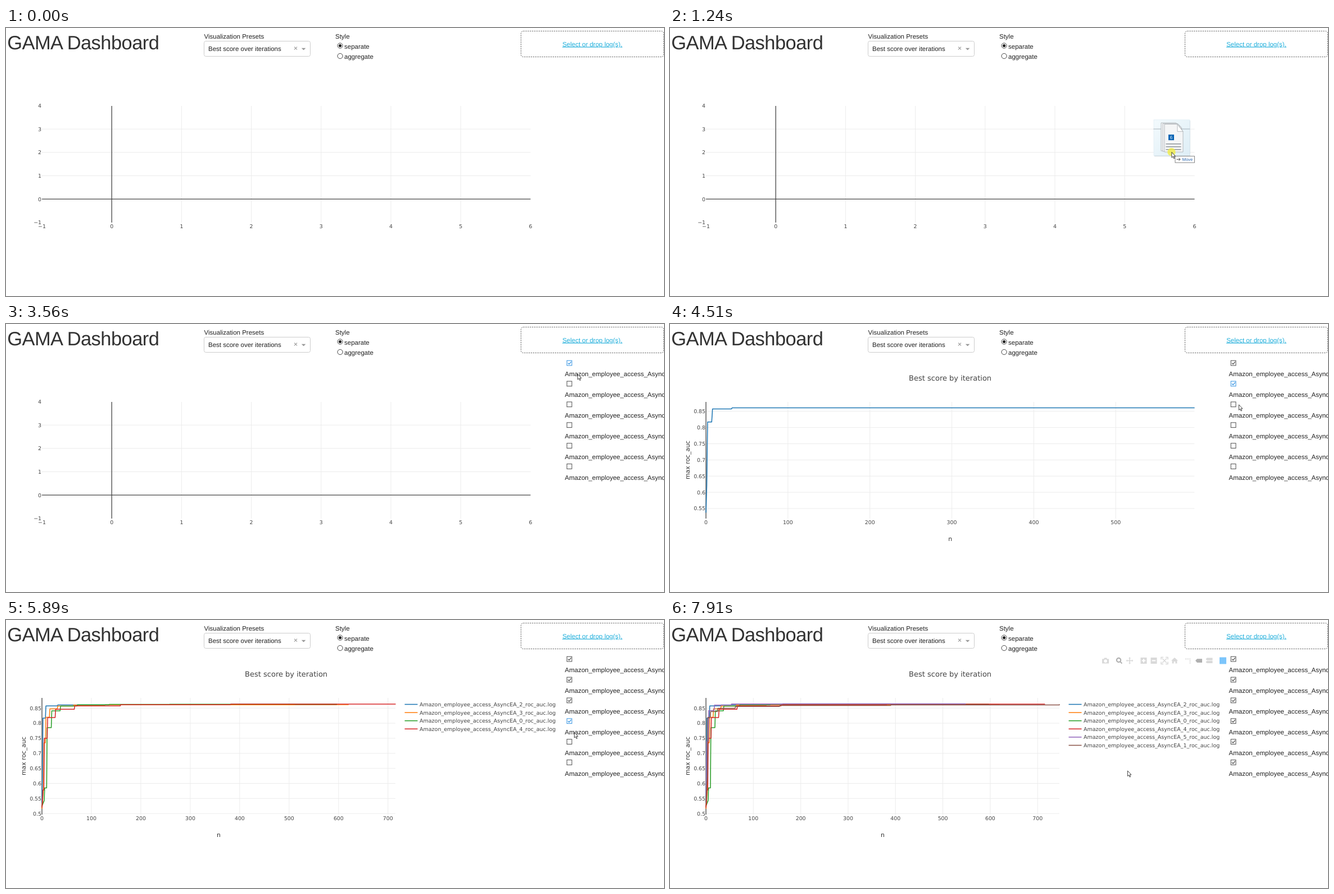
Recreate the animation shown at these times as an HTML page. Size 1171 by 478 pixels, loop 8000 ms.

```html
<!DOCTYPE html>
<html lang="en">
<head>
<meta charset="utf-8">
<title>GAMA Dashboard</title>
<style>
  html, body { margin: 0; width: 100%; height: 100%; overflow: hidden; background: #fff; }
  svg { display: block; width: 100%; height: 100%; }
  text { font: 11.5px "Liberation Sans", Arial, sans-serif; fill: #222; white-space: pre; text-rendering: geometricPrecision; }
  .h1 { font-size: 34.43px; letter-spacing: -.53px; fill: #323232; }
  .plot text { font: 9.4px "DejaVu Sans", Verdana, sans-serif; fill: #444; }
  .plot .title { font-size: 13px; }
  .plot .axis { font-size: 10.9px; fill: #333; }
  .plot .key { font-size: 9.53px; }
  .grid { stroke: #ebebeb; stroke-width: .95; }
  .zero { stroke: #444; stroke-width: 1.3; }
  .trace { fill: none; stroke-width: 1.55; stroke-linejoin: round; }
  #drop { fill: #fff; stroke: #555; stroke-width: .9; stroke-dasharray: 2.3 1.6; }
  #drop.over { fill: #eee; stroke: #6c6; stroke-width: 1; stroke-dasharray: none; }
</style>
</head>
<body>
<svg viewBox="0 0 1171 478" xmlns="http://www.w3.org/2000/svg">
  <defs>
    <linearGradient id="tile" x2="1" y2="1">
      <stop offset="0" stop-color="#f3fafd"/><stop offset="1" stop-color="#deeef6"/>
    </linearGradient>
  </defs>

  <text class="h1" x="2.3" y="37.5">GAMA Dashboard</text>
  <text x="352.6" y="18.5">Visualization Presets</text>
  <rect x="352.5" y="23.5" width="189" height="27" rx="3" fill="#fff" stroke="#ccc"/>
  <text x="360" y="40.5">Best score over iterations</text>
  <path d="M513 33.7l5 5m0-5l-5 5" stroke="#999" stroke-width="1.1"/>
  <path d="M525.8 35.8h7.6l-3.8 3.8z" fill="#999"/>
  <text x="586" y="18.5">Style</text>
  <g fill="#fff" stroke="#444"><circle cx="594.6" cy="31.5" r="4.6"/><circle cx="594.6" cy="50" r="4.6"/></g>
  <circle cx="594.6" cy="31.5" r="2.6" fill="#222"/>
  <text x="602" y="37">separate</text>
  <text x="602" y="55.4">aggregate</text>

  <rect id="drop" x="916.5" y="5.5" width="254" height="46" rx="4"/>
  <text x="1043.5" y="32.5" text-anchor="middle" text-decoration="underline" style="fill:#1eaedb">Select or drop log(s).</text>

  <g id="plot" class="plot"></g>
  <g id="logs"></g>

  <g id="bar" fill="#444" stroke="#444" stroke-width="0">
    <g opacity=".2">
      <path fill-rule="evenodd" d="M769 69.5h3l1-2h4l1 2h3v8h-12zM775 70.3a2.9 2.9 0 1 0 .1 0z"/>
      <path d="M818 67v11m-5.5-5.5h11" stroke-width="1.6"/>
      <path d="M816 68.5l2-2.4 2 2.4zM816 76.5l2 2.4 2-2.4zM814 70.5l-2.4 2 2.4 2zM822 70.5l2.4 2-2.4 2z"/>
      <path fill-rule="evenodd" d="M837.5 67h11v11h-11zM842 69.3v2.2h-2.2v2h2.2v2.2h2v-2.2h2.2v-2H844v-2.2z"/>
      <path fill-rule="evenodd" d="M855.5 67h11v11h-11zM857.8 71.5v2h6.4v-2z"/>
      <path d="M874 70.5v-4h4M882 66.5h4v4M886 74.5v4h-4M878 78.5h-4v-4M876 68.5l8 8m0-8l-8 8" fill="none" stroke-width="1.5"/>
      <path d="M892 72.5l6-5.5 6 5.5h-1.6v5h-3v-3.4h-2.8v3.4h-3v-5z"/>
      <path d="M917 69.5h8.5v8.5" fill="none" stroke-width="1.5" stroke-dasharray="2.4 1.2"/>
      <path d="M953.5 70l2-2.5h10v4.2h-10zM953.5 75.2l2-2.5h10v4.4h-10z"/>
    </g>
    <g opacity=".42">
      <circle cx="798.5" cy="71.5" r="3.6" fill="none" stroke-width="2.2"/>
      <path d="M801 74l3.4 3.6" stroke-width="2"/>
      <path d="M935 72.5l3-3.2h9v6.6h-9z"/>
    </g>
    <rect x="978" y="66.5" width="12" height="12" fill="#7cc5fb"/>
  </g>

  <g id="file">
    <rect x="-30.6" y="-56" width="64" height="64" fill="#9fb4bf" opacity=".45"/>
    <rect x="-31.5" y="-57.3" width="64" height="63.5" fill="url(#tile)" stroke="#dcecf4" stroke-width=".7"/>
    <path d="M-32 -41H32.5" stroke="#3c4a55" opacity=".4"/>
    <g fill="#f5f6f7" stroke="#aeb4b8" stroke-width=".9">
      <path d="M-18.5 -52H8l7 7V-2H-18.5z"/>
      <path d="M-15.5 -50.5H11l7 7V-1H-15.5z"/>
      <path d="M-12.5 -49.5H12l8.5 13V0H-12.5z"/>
      <path d="M10.5 -49v12.5h10z" fill="#fff"/>
    </g>
    <path d="M-10 -14.5H17M-10 -9.5H17M-10 -4.5H17" stroke="#8e9499" stroke-width="1.5"/>
    <rect x="-5.5" y="-31" width="10" height="10" fill="#0a64b4"/>
    <text x="-.5" y="-23" text-anchor="middle" style="font-size:8px;fill:#fff">6</text>
    <circle r="7.2" fill="#f1ee3c" opacity=".75"/>
    <rect x="6.5" y="7.5" width="34.5" height="11.5" fill="#fff" stroke="#777" stroke-width=".9"/>
    <path d="M9 13.2h6.5m-2.6-2.6l2.6 2.6-2.6 2.6" fill="none" stroke="#333" stroke-width=".9"/>
    <text x="19" y="16" style="font:7.3px 'Open Sans',sans-serif;fill:#1659a8">Move</text>
  </g>
  <path id="cursor" d="M.4 .4V10l2.2-1.9 1.5 3.5 1.5-.6-1.5-3.5h2.9z" fill="#fff" stroke="#222" stroke-width=".85"/>
</svg>
<script>
const LOOP = 8000, BEAT = 77;
const GRAB = 460, DRAG = 11 * BEAT, ARRIVE = 21 * BEAT, DROPPED = 1780, UPLOADED = 1850, LISTED = 2170, LEAVE = 7760;
const TOP = 139, BOTTOM = 347, LEFT = 64;
const LOG = 'Amazon_employee_access_AsyncEA_';
const $ = id => document.getElementById(id);

// Ticking a log shows its trace after a short delay.
const tickAt = [3320, 4190, 5040, 5550, 6350, 7040];
const DELAY = 330;

// A best score climbs in steps: the gap to its top shrinks by `decay`
// each time n grows by the factor `grow`, beginning at n = n0.
const traces = [
  { color: '#1f77b4', id: 2, last: 596, from: .537, first: .817, top: .861, n0: 2, grow: 4, decay: .08 },
  { color: '#ff7f0e', id: 3, last: 620, from: .516, first: .735, top: .8615, n0: 4, grow: 2, decay: .33 },
  { color: '#2ca02c', id: 0, last: 597, from: .525, first: .585, top: .863, n0: 5.5, grow: 1.9, decay: .28 },
  { color: '#d62728', id: 4, last: 715, from: .52, first: .578, top: .8646, n0: 2, grow: 2.4, decay: .4 },
  { color: '#9467bd', id: 5, last: 548, from: .56, first: .74, top: .8644, n0: 2, grow: 3, decay: .18 },
  { color: '#8c564b', id: 1, last: 746, from: .54, first: .819, top: .863, n0: 4, grow: 2.5, decay: .55 }
];

const lerp = (a, b, k) => a + (b - a) * k;
const count = (t, delay = 0) => tickAt.filter(a => t >= a + delay).length;
const line = (cls, x1, y1, x2, y2) => `<path class="${cls}" d="M${x1} ${y1}L${x2} ${y2}"/>`;
const text = (x, y, s, attrs = '') => `<text x="${x}" y="${y}" ${attrs}>${s}</text>`;
const stroke = (color, d) => `<path class="trace" stroke="${color}" d="${d}"/>`;
const label = v => String(+v.toFixed(2)).replace('-', '−');
const MID = 'text-anchor="middle"', END = 'text-anchor="end"';

function emptyPlot() {
  const X = v => 188.2 + v * 124.2, Y = v => 305.1 - v * 41.6;
  let out = '';
  for (let v = 1; v < 6; v++) out += line('grid', X(v), TOP, X(v), BOTTOM);
  for (let v = 1; v < 4; v++) out += line('grid', LEFT, Y(v), 933.5, Y(v));
  out += line('zero', X(0), TOP, X(0), BOTTOM) + line('zero', LEFT, Y(0), 933.5, Y(0));
  for (let v = -1; v < 7; v++) out += text(X(v), 356.8, label(v), MID);
  for (let v = -1; v < 5; v++) out += text(63, Y(v) + 3.4, label(v), END);
  return out;
}

function tracePath({ last, from, first, top, n0, grow, decay }, X, Y) {
  let d = `M${X(0)} ${Y(from)}L${X(n0 - 1)} ${Y(lerp(from, first, .3))}`;
  let gap = top - first;
  for (let n = n0; n < last; n *= grow, gap *= decay)
    d += `L${X(n)} ${Y(top - gap)}H${X(Math.min(last, n * grow - 1))}`;
  return d + `L${X(last)} ${Y(top)}`;
}

function scorePlot(size) {
  const shown = traces.slice(0, size);
  const right = size > 1 ? 693 : 933.3, pad = 10.4;
  const maxN = Math.max(...shown.map(s => s.last));
  const lo = Math.min(...shown.map(s => s.from)), hi = Math.max(...shown.map(s => s.top));
  const X = n => lerp(LEFT, right, n / maxN);
  const Y = v => lerp(BOTTOM - pad, TOP + pad, (v - lo) / (hi - lo));
  let out = '', names = '';
  for (let n = 0; n <= maxN; n += 100) {
    if (n) out += line('grid', X(n), TOP, X(n), BOTTOM);
    names += text(X(n), 356.8, n, MID);
  }
  for (let v = .85; Y(v) < BOTTOM; v -= .05) {
    out += line('grid', LEFT, Y(v), right, Y(v));
    names += text(63, Y(v) + 3.4, label(v), END);
  }
  out += line('zero', LEFT, TOP, LEFT, BOTTOM);
  shown.forEach((s, i) => {
    const y = 150.5 + i * 14.6;
    out += stroke(s.color, tracePath(s, X, Y));
    if (size > 1)
      names += stroke(s.color, `M709.5 ${y}h23`) + text(736, y + 3.4, `${LOG}${s.id}_roc_auc.log`, 'class="key"');
  });
  return out + names
    + text(498.6, 100.8, 'Best score by iteration', `class="title" ${MID}`)
    + text((LEFT + right) / 2, 386.8, 'n', `class="axis" ${MID}`)
    + text(0, 0, 'max roc_auc', `class="axis" ${MID} transform="translate(34.5 242.5) rotate(-90)"`);
}

function logList(ticked, focus) {
  return traces.map(({ id }, i) => {
    const y = 69.6 + i * 36.88, color = i === focus ? '#2a8ee0' : '#444';
    const tick = i < ticked ? `<path d="M1000 ${y}l2 2.1 3.8-4.4" fill="none" stroke="${color}" stroke-width="1.15"/>` : '';
    return `<rect x="998.2" y="${y - 4.4}" width="8.8" height="8.8" fill="#fff" stroke="${color}" stroke-width=".95"/>`
      + tick + text(994.5, y + 23.8, `${LOG}${id}_roc_auc.log`);
  }).join('');
}

// After the drop the pointer drifts down the list, then off into the plot.
const drift = [
  [2772, 1023, 28], [3080, 1005, 83], [3311, 1005, 83], [3542, 1017, 89], [4466, 1012, 143.5],
  [5852, 1011, 200], [7007, 1002, 253], [7700, 1002, 253], [7854, 814, 268.5]
];
const bezier = (a, b, c, d, k) =>
  lerp(lerp(lerp(a, b, k), lerp(b, c, k), k), lerp(lerp(b, c, k), lerp(c, d, k), k), k);

function pointer(t) {
  const q = Math.floor(t / BEAT + .15) * BEAT;
  if (q < 7 * BEAT) return [511, 340];
  if (q < DRAG) return [541, 346];
  if (q < drift[0][0]) {
    const k = Math.min(1, (q - DRAG) / (ARRIVE - DRAG));
    return [bezier(621, 948, 884, 1023, k), bezier(346, 375, 90, 28, k)];
  }
  const i = drift.findIndex(p => p[0] >= q);
  if (i < 1) return drift.at(i).slice(1);
  const [t0, x0, y0] = drift[i - 1], [t1, x1, y1] = drift[i];
  const k = (q - t0) / (t1 - t0);
  return [lerp(x0, x1, k), lerp(y0, y1, k)];
}

const cache = {};
function fill(id, key, make) {
  if (cache[id] === key) return;
  cache[id] = key;
  $(id).innerHTML = make();
}
const show = (id, on) => $(id).setAttribute('visibility', on ? 'visible' : 'hidden');

function render(t) {
  const [x, y] = pointer(t);
  for (const id of ['file', 'cursor']) $(id).setAttribute('transform', `translate(${x} ${y})`);
  show('cursor', t >= GRAB);
  show('file', t >= GRAB && t < DROPPED);
  show('bar', t >= LEAVE);
  $('drop').classList.toggle('over', t < UPLOADED && x > 916 && y < 52);

  const drawn = count(t, DELAY), ticked = count(t);
  const focus = t < LEAVE ? ticked - 1 : -1;
  fill('plot', drawn, () => drawn ? scorePlot(drawn) : emptyPlot());
  fill('logs', t < LISTED ? '' : `${ticked},${focus}`, () => t < LISTED ? '' : logList(ticked, focus));
}

const start = performance.now();
function loop() {
  render((performance.now() - start) % LOOP);
  requestAnimationFrame(loop);
}
loop();
</script>
</body>
</html>
```
